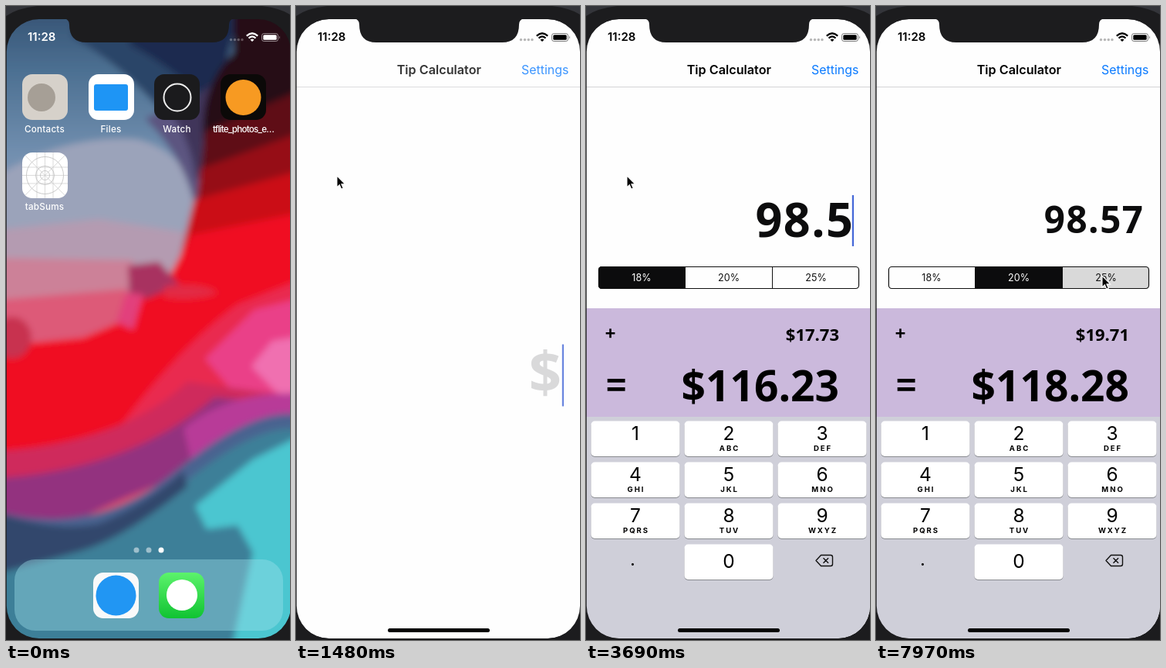
An HTML page that plays this animation: 368 px wide and 818 px high, repeating every 8000 ms.

```html
<!DOCTYPE html>
<html lang="en">
<head>
<meta charset="utf-8">
<title>Tip Calculator</title>
<style>
  html, body { margin: 0; width: 100%; height: 100%; overflow: hidden; background: #1c1c1e; }
  svg { display: block; width: 100%; height: 100%; font-family: Inter, Roboto, sans-serif; }
  .mid { text-anchor: middle; }
  .end { text-anchor: end; }
  .label { font-size: 11.700px; font-weight: 500; letter-spacing: .2px; fill: #fff; text-anchor: middle; }
  .digits { font-family: "Noto Sans", "Open Sans", sans-serif; font-weight: 700; text-anchor: end; }
  .letters { font-size: 9.600px; font-weight: 700; letter-spacing: 1.900px; text-anchor: middle; }
</style>
</head>
<body>
<svg viewBox="0 0 368 818" preserveAspectRatio="none">
  <defs>
    <linearGradient id="sky" x2="0" y2="1">
      <stop stop-color="#2f4a6b"/><stop offset=".12" stop-color="#4c7092"/>
      <stop offset=".25" stop-color="#7390b0"/><stop offset=".4" stop-color="#a39bb3"/>
      <stop offset=".52" stop-color="#e0506c"/>
    </linearGradient>
    <linearGradient id="green" x2="0" y2="1">
      <stop stop-color="#5cf36c"/><stop offset="1" stop-color="#10c332"/>
    </linearGradient>
    <filter id="soft" x="-5%" y="-5%" width="110%" height="110%"><feGaussianBlur stdDeviation="4.500"/></filter>
    <clipPath id="window"><rect id="windowShape" y="17" width="368"/></clipPath>
    <clipPath id="segmentBox"><rect x="16" y="336" width="338" height="29" rx="4.500"/></clipPath>
    <g id="status">
      <text x="28" y="45.300" font-size="15" font-weight="600">11:28</text>
      <g opacity=".28"><circle cx="291.500" cy="43.500" r="1.700"/><circle cx="296.500" cy="43.500" r="1.700"/><circle cx="301.300" cy="43.500" r="1.700"/><circle cx="306" cy="43.500" r="1.700"/></g>
      <g fill="none" stroke="currentColor" stroke-width="2.300">
        <path d="M311.800 38.600Q319 32 326.200 38.600M314.500 41.500Q319 37.300 323.500 41.500"/>
        <rect x="331.500" y="35.500" width="21" height="10" rx="2.800" stroke-width="1" opacity=".5"/>
      </g>
      <path d="M316.500 43.500Q319 41.300 321.500 43.500L319 46Z"/>
      <rect x="333.300" y="37.200" width="17.400" height="6.600" rx="1.500"/>
      <path d="M354 38.500q2 2 0 4z" opacity=".5"/>
    </g>
  </defs>

  <g id="home">
    <g filter="url(#soft)">
      <path d="M-20-20H390V840H-20Z" fill="url(#sky)"/>
      <path d="M90-20H310L265 130 205 140Q150 75 85 40Z" fill="#2b4468"/>
      <path d="M170-20H310L270 130Q210 75 160 50Z" fill="#1f2c50"/>
      <path d="M-20 225Q70 165 170 172 225 185 246 240L218 342-20 335Z" fill="#9ba3ba"/>
      <path d="M180 145L262 110 262 200 246 265Q235 200 180 145Z" fill="#5c5580"/>
      <path d="M215 140L275 95 275 195 246 225Q240 175 215 140Z" fill="#40365a"/>
      <path d="M295-20H390V130L258 190Q245 110 295 60Z" fill="#280712"/>
      <path d="M258 162L390 105V205L248 250Z" fill="#5e0a18"/>
      <path d="M252 210L390 160V245L242 290Z" fill="#960a16"/>
      <path d="M244 250L390 210V310L220 345Z" fill="#cb0c18"/>
      <path d="M-20 290L120 275 232 292 216 345-20 345Z" fill="#b49bb1"/>
      <path d="M-20 325L165 328 155 378-20 390Z" fill="#cc8198"/>
      <path d="M-20 380L158 365 145 412 100 430-20 445Z" fill="#dd5a78"/>
      <path d="M390 265L240 295 212 348 165 360 148 408 100 428-20 440V640Q120 640 390 540Z" fill="#f01122"/>
      <ellipse cx="8" cy="428" rx="25" ry="27" fill="#c8304f"/>
      <path d="M158 335L198 330 225 360 182 378 160 370Z" fill="#a83260"/>
      <path d="M155 370L178 372 165 418 143 408Z" fill="#e2407c"/>
      <path d="M205 362Q255 355 275 370 245 382 205 376Z" fill="#e22a45"/>
      <path d="M390 350L300 385Q225 440 150 540L390 540Z" fill="#e92a50"/>
      <path d="M390 375L322 392 258 455 300 505 390 530Z" fill="#ea3f88"/>
      <path d="M390 425L345 432 318 465 350 498 390 510Z" fill="#f070b0"/>
      <path d="M-20 575Q150 565 235 485L390 505V560L-20 650Z" fill="#cf2a5c"/>
      <path d="M-20 610Q160 600 270 505L390 515V550Q200 610 100 660L-20 675Z" fill="#93307f"/>
      <path d="M230 545Q290 495 390 500V540L240 588Z" fill="#b83a98"/>
      <path d="M-20 650Q110 690 220 600T390 530V840H-20Z" fill="#4a6490"/>
      <path d="M-20 700Q110 720 220 625T390 548V840H-20Z" fill="#3d7f98"/>
      <path d="M-20 650Q60 680 120 668 180 645 230 600L235 620Q150 690 90 705L-20 735Z" fill="#33466c"/>
      <path d="M245 645L320 585 390 550V840H290L320 705 300 670 260 675Z" fill="#4cc6d0"/>
    </g>
    <rect id="dim" width="368" height="818"/>
    <g id="icons">
      <rect x="11" y="714" width="348" height="92" rx="27" fill="#9fe0ea" opacity=".4"/>
      <rect x="21" y="88" width="59" height="59" rx="13" fill="#d6d1ca"/><circle cx="46" cy="118" r="18" fill="#a69f96"/>
      <rect x="107" y="88" width="59" height="59" rx="13" fill="#fff"/><rect x="114" y="101" width="44" height="34" rx="3" fill="#1e95f5"/>
      <rect x="192" y="88" width="59" height="59" rx="13" fill="#1b1b1d"/><circle cx="222" cy="118" r="17.500" fill="none" stroke="#eee" stroke-width="2"/>
      <rect x="278" y="88" width="59" height="59" rx="13" fill="#0b0908"/><circle cx="307.500" cy="118" r="23" fill="#f79a22"/>
      <rect x="21" y="189" width="59" height="59" rx="13" fill="#fff"/>
      <path d="M21 218.500H80M50.500 189V248M25 193L76 244M76 193L25 244M40 189V248M61 189V248M21 208H80M21 229H80" stroke="#ccc" stroke-width=".7"/>
      <g fill="none" stroke="#bbb" stroke-width=".8"><circle cx="50.500" cy="218.500" r="6"/><circle cx="50.500" cy="218.500" r="12"/><circle cx="50.500" cy="218.500" r="24"/></g>
      <rect x="113" y="731" width="59" height="59" rx="13" fill="#f9f9f9"/><circle cx="142.500" cy="760.500" r="26" fill="#2196f3"/>
      <rect x="198" y="731" width="59" height="59" rx="13" fill="url(#green)"/><circle cx="228" cy="760" r="20" fill="#fff"/>
    </g>
    <g id="labels">
      <text class="label" x="50" y="163">Contacts</text><text class="label" x="136" y="163">Files</text>
      <text class="label" x="221.500" y="163">Watch</text><text class="label" x="307.500" y="163" style="letter-spacing:-.8px">tflite_photos_e…</text>
      <text class="label" x="50" y="263">tabSums</text>
      <g fill="#fff"><circle cx="169" cy="702" r="3.500" opacity=".5"/><circle cx="185" cy="702" r="3.500" opacity=".5"/><circle cx="201" cy="702" r="3.500"/></g>
    </g>
    <use id="homeStatus" href="#status" fill="#fff" color="#fff"/>
  </g>

  <g id="app" clip-path="url(#window)">
    <rect y="17" width="368" height="800" fill="#fefefe"/>
    <use href="#status" fill="#000" color="#000"/>
    <g id="content">
      <text class="mid" x="185.300" y="88.300" font-size="16.200" font-weight="600">Tip Calculator</text>
      <text class="end" x="353.300" y="88.300" font-size="15.900" fill="#0a7aff">Settings</text>
      <path d="M0 104.500H368" stroke="#d4d4d6"/>
      <text id="field" class="digits"></text>
      <rect id="caret" x="344.800" width="2.200" fill="#4467d8"/>
      <g id="results">
        <g clip-path="url(#segmentBox)">
          <rect id="pressed" y="336" width="113" height="29" fill="#d9d9d9"/>
          <rect id="selected" y="336" width="113" height="29" fill="#0c0c0d"/>
        </g>
        <path d="M128.500 337V364M241.500 337V364" stroke="#111"/>
        <rect x="16.500" y="336.500" width="337" height="28" rx="4" fill="none" stroke="#111" stroke-width="1.200"/>
        <g id="rates" class="mid" font-size="12.600"></g>
        <rect y="390" width="368" height="145" fill="#cbb9dc"/>
        <text class="mid" x="31.700" y="428.500" font-size="24" font-weight="600">+</text>
        <text class="mid" x="39.300" y="503" font-size="50" font-weight="500">=</text>
        <text id="tip" class="digits" x="328" y="432" font-size="22"></text>
        <text id="total" class="digits" x="328" y="510" font-size="55"></text>
      </g>
    </g>
    <g id="keyboard">
      <rect id="keyboardBack" y="530" width="368" height="300"/>
      <g id="keys"></g>
      <text class="mid" x="60.500" y="722" font-size="24">.</text>
      <path d="M304.500 708.500H317q2.500 0 2.500 2.500v9q0 2.500-2.500 2.500H304.500L298 715.500ZM307.500 712.200l6.600 6.600m0-6.600l-6.600 6.600" fill="none" stroke="#111" stroke-width="1.400" stroke-linejoin="round"/>
    </g>
    <rect id="indicator" x="119" y="803" width="132" height="5" rx="2.500"/>
  </g>

  <path d="M0 0H368V818H0ZM.8 59V774A42 42 0 0 0 42.800 816H327A42 42 0 0 0 369 774V59A42 42 0 0 0 327 17H42.800A42 42 0 0 0 .8 59Z" fill="#1c1c1e" fill-rule="evenodd"/>
  <path d="M76 16.500Q82 17.500 82 24 82 47 104 47H267Q289 47 289 24 289 17.500 295 16.500Z" fill="#1c1c1e"/>
  <path d="M0 0H40Q14 3 0 13ZM368 0H332Q356 3 368 11Z" fill="#34353a"/>
  <path id="cursor" d="M0 0V15l3.400-3.200 2.300 5.400 2.500-1.100-2.300-5.200H10.700Z" stroke="#fff" stroke-width="1.100"/>
</svg>

<script>
const LOOP = 8000, STEP = 147.6;
const $ = id => document.getElementById(id);
const set = (id, attrs) => { for (const name in attrs) $(id).setAttribute(name, attrs[name]); };
const mix = (a, b, p) => a + (b - a) * p;
const clamp = v => Math.max(0, Math.min(1, v));

// Interpolates [step, ...values] keys.
function track(keys, step) {
  const next = keys.findIndex(key => key[0] > step);
  if (next < 0) return keys[keys.length - 1].slice(1);
  if (next === 0) return keys[0].slice(1);
  const a = keys[next - 1], b = keys[next];
  const p = (step - a[0]) / (b[0] - a[0]);
  return a.slice(1).map((v, i) => mix(v, b[i + 1], p));
}

const launchKeys = [[2, 0], [3, .08], [4, .26], [5, .49], [6, .696], [7, .87], [8, .97], [9, 1]];
const keyboardKeys = [[10, 300], [11, 245], [12, 135], [13, 55], [14, 14], [15, 0]];
const cursorKeys = [[32, 53, 219], [33, 62, 227], [34, 112, 266], [35, 174, 314], [36, 178, 343],
  [37, 177, 362], [38, 175, 359], [40, 174, 353], [42, 174, 351], [48, 174, 351],
  [49, 182, 351], [50, 214, 350], [51, 254, 349], [52, 284, 348], [53, 293, 348]];
const segmentX = [15.5, 128, 241];
const rates = [.18, .2, .25];

const letters = ['', 'ABC', 'DEF', 'GHI', 'JKL', 'MNO', 'PQRS', 'TUV', 'WXYZ'];
$('keys').innerHTML = [...letters, ''].map((caption, i) => {
  const zero = i === 9;
  const x = 6.5 + 121 * (zero ? 1 : i % 3), y = 535.5 + 53 * Math.floor(i / 3), mid = x + 57.5;
  return `<rect x="${x}" y="${y + 1}" width="115" height="45.500" rx="5" fill="#898b90"/>
    <rect x="${x}" y="${y}" width="115" height="45.500" rx="5" fill="#fff"/>
    <text class="mid" x="${mid}" y="${y + (zero ? 30 : 24.5)}" font-size="24.500">${zero ? 0 : i + 1}</text>
    <text class="letters" x="${mid + 1}" y="${y + 38.5}">${caption}</text>`;
}).join('');
$('rates').innerHTML = rates.map((rate, i) =>
  `<text x="${72 + 113 * i}" y="355">${rate * 100}%</text>`).join('');

// Text, font size and vertical centre of the bill field.
function billAt(step) {
  if (step < 23) return ['$', 74, 476.5];
  if (step < 24) return ['9', 74, 476.5];
  if (step < 25) return ['98', 74, 350];
  if (step < 29) return ['98.5', 61, 277];
  return ['98.57', 47.5, 277];
}

function caretHidden(step) {
  if (step < 23) return step > 10 && (step - 4) % 7 < 3;
  return step >= 33 && (step - 33) % 7 < 3;
}

function drawHome(p) {
  $('home').style.display = p < 1 ? '' : 'none';
  const fade = clamp(p / .6);
  set('dim', { opacity: .32 * fade });
  set('labels', { opacity: 1 - fade });
  set('homeStatus', { opacity: 1 - .45 * fade });
  const scale = 1 - .035 * fade;
  set('icons', {
    transform: `translate(${184 + 5 * fade} 430) scale(${scale}) translate(-184 -430)`,
    opacity: 1 - .45 * fade
  });
  $('icons').style.filter = fade ? `blur(${7 * fade}px)` : 'none';
}

function drawWindow(p) {
  const eased = p ** 1.07;
  const width = mix(59, 368, eased), scale = width / 368;
  const height = mix(59, 799, p ** 1.55);
  const left = mix(50.5, 184, p) - width / 2, top = mix(218.5, 416.5, eased) - height / 2;
  set('app', { transform: `translate(${left} ${top}) scale(${scale}) translate(0 -17)`, opacity: clamp(p * 4) });
  set('windowShape', { height: height / scale, rx: mix(84, 42, p) });
}

function drawCalculator(step) {
  const [bill, size, centre] = billAt(step);
  const decimal = bill.includes('.');
  set('content', { opacity: step < 9 ? 0 : step < 10 ? .4 : step < 11 ? .8 : 1 });
  set('indicator', { opacity: step < 9 ? 0 : 1 });
  $('field').textContent = bill;
  set('field', {
    x: decimal ? 347.5 : 344, y: centre + size * (decimal ? .345 : .305), 'font-size': size,
    'letter-spacing': decimal ? 1.5 : 0, fill: bill === '$' ? '#d0d0d2' : '#0c0c0d'
  });
  const caretHeight = size * 1.08;
  set('caret', { y: centre - caretHeight / 2, height: caretHeight, opacity: caretHidden(step) ? 0 : 1 });

  const choice = step < 45 ? 0 : 1;
  const pressing = step >= 54 ? 2 : step >= 43 && step < 45 ? 1 : -1;
  set('selected', { x: segmentX[choice] });
  set('pressed', { x: segmentX[Math.max(0, pressing)], opacity: pressing < 0 ? 0 : 1 });
  [...$('rates').children].forEach((label, i) => label.setAttribute('fill', i === choice ? '#fff' : '#111'));

  const amount = Number(bill) || 0, tip = amount * rates[choice];
  $('tip').textContent = '$' + tip.toFixed(2);
  $('total').textContent = '$' + (amount + tip).toFixed(2);
  set('results', {
    opacity: step < 24 ? 0 : step < 25 ? .6 : 1,
    transform: `translate(0 ${step < 25 ? 65 : 0})`
  });
  set('keyboard', { transform: `translate(0 ${track(keyboardKeys, step)[0]})` });
  set('keyboardBack', { fill: step < 25 ? '#d0d3da' : '#cfcfd9' });
}

function draw(time) {
  const step = Math.floor((time + 6) / STEP);
  const [launch] = track(launchKeys, step);
  drawHome(launch);
  drawWindow(launch);
  drawCalculator(step);
  set('cursor', { transform: `translate(${track(cursorKeys, step).join(' ')})`, opacity: step < 1 ? 0 : 1 });
}

function tick() {
  draw(performance.now() % LOOP);
  requestAnimationFrame(tick);
}
tick();
</script>
</body>
</html>
```
